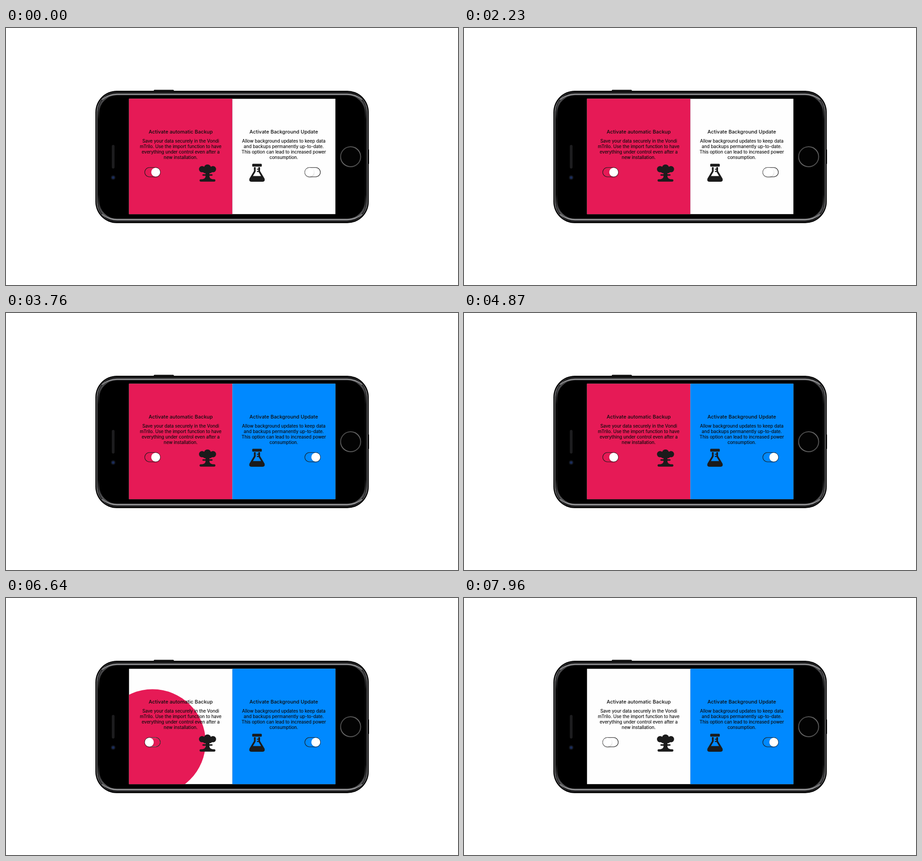
Write an HTML page that moves like this. It is 991 px wide and 565 px high and loops after 7.99 s.

```html
<!DOCTYPE html>
<html lang="en">
<head>
<meta charset="utf-8">
<title>Paper switches</title>
<style>
  html, body { margin: 0; width: 100%; height: 100%; overflow: hidden; background: #fff; }
  svg { display: block; width: 991px; height: 565px; }
  text { font-family: Inter, "Noto Sans", sans-serif; fill: #0c0c0c; text-anchor: middle; }
  .title { font-size: 11px; font-weight: 500; }
  .body { font-size: 9.77px; stroke: #0c0c0c; stroke-width: .15px; }
  .ink { fill: #1b1b1b; }
</style>
</head>
<body>
<svg viewBox="0 0 991 565">
  <defs>
    <linearGradient id="gloss" x1="0" y1="0" x2="0" y2="1">
      <stop offset="0" stop-color="#59595b"/>
      <stop offset=".1" stop-color="#3a3a3c"/>
      <stop offset=".2" stop-color="#0a0a0a"/>
      <stop offset=".8" stop-color="#0a0a0a"/>
      <stop offset=".9" stop-color="#3a3a3c"/>
      <stop offset="1" stop-color="#6a6a6c"/>
    </linearGradient>
    <linearGradient id="rim" x1="0" y1="0" x2="0" y2="1">
      <stop offset="0" stop-color="#2c2c2e"/>
      <stop offset=".12" stop-color="#8c8c8e"/>
      <stop offset=".88" stop-color="#8c8c8e"/>
      <stop offset="1" stop-color="#2c2c2e"/>
    </linearGradient>
    <linearGradient id="ring" x1="0" y1="0" x2="1" y2="1">
      <stop offset="0" stop-color="#3a3a3a"/>
      <stop offset=".5" stop-color="#6c6c6c"/>
      <stop offset="1" stop-color="#444"/>
    </linearGradient>
    <filter id="soft" x="-50%" y="-50%" width="200%" height="200%">
      <feGaussianBlur stdDeviation="1.6"/>
    </filter>
    <clipPath id="leftClip"><rect x="269.7" y="155.6" width="226.5" height="253.6"/></clipPath>
    <clipPath id="rightClip"><rect x="496.2" y="155.6" width="226" height="253.6"/></clipPath>
  </defs>

  <!-- phone -->
  <rect x="324" y="135.8" width="44" height="6" rx="1.5" fill="#222"/>
  <rect x="790" y="267" width="6" height="32" rx="1" fill="#222"/>
  <rect x="196" y="138" width="599.3" height="291" rx="47"/>
  <rect x="202.5" y="145.5" width="586.3" height="276" rx="41" fill="none" stroke="url(#gloss)" stroke-width="4.5"/>
  <rect x="199.3" y="141" width="592.7" height="285" rx="44" fill="none" stroke="url(#rim)" stroke-width="1.4"/>
  <path d="M211 157Q222 147 243 146H748Q769 147 780 157M211 410Q222 420 243 421H748Q769 420 780 410"
    fill="none" stroke="#a4a4a6" stroke-width="1.6" stroke-linecap="round"/>
  <rect x="232" y="257" width="6" height="52" rx="3" fill="#1d1d1f"/>
  <circle cx="235" cy="328.8" r="5" fill="#12161f"/>
  <circle cx="235" cy="328.8" r="2.8" fill="#1b2d5c"/>
  <circle cx="755.6" cy="283" r="22" fill="#030303" stroke="url(#ring)" stroke-width="2"/>

  <!-- screen -->
  <rect x="269.7" y="155.6" width="452.5" height="253.6" fill="#fefefe"/>
  <g clip-path="url(#leftClip)"><circle id="leftDisc" cx="321.2" cy="317" fill="#e61a56"/></g>
  <g clip-path="url(#rightClip)"><circle id="rightDisc" cx="672.2" cy="317" fill="#0089ff"/></g>
  <rect x="495.8" y="155.6" width="1.2" height="253.6" fill="#8793a8" opacity=".35"/>
  <g id="copy"></g>

  <!-- mushroom cloud -->
  <g class="ink">
    <circle cx="429.9" cy="310.4" r="6.8"/><circle cx="441.8" cy="307.8" r="7.8"/><circle cx="453.8" cy="310.4" r="6.8"/>
    <circle cx="436.6" cy="313.4" r="5.8"/><circle cx="447" cy="313.4" r="5.8"/>
    <rect x="430.5" y="321.4" width="22.5" height="3.4" rx="1.7"/>
    <path d="M437.5 316h8.5v10q0 5 7 6.5h3.5a2.6 2.6 0 0 1 0 5.2h-29.5a2.6 2.6 0 0 1 0-5.2h3.5q7-1.5 7-6.5z"/>
  </g>

  <!-- flask -->
  <g class="ink">
    <rect x="539.8" y="298.4" width="21" height="6.4" rx="1.6"/>
    <path fill-rule="evenodd" d="M543.6 306h13.4v8.4l9.8 16.6q2 7-4.2 7h-24.6q-6.2 0-4.2-7l9.8-16.6z
      M547.4 306v9.6l-6 9.8h17.8l-6-9.8v-9.6z"/>
    <path d="M550 309.4h4v2.2h-4zM550 314.2h4v2.2h-4z"/>
  </g>

  <g id="switches"></g>
</svg>

<script>
const LOOP = 7990, FULL_RADIUS = 238, DISC_TIME = 413;
const RED = [230, 26, 86], BLUE = [0, 137, 255], WHITE = [232, 226, 229];
const byId = id => document.getElementById(id);

function add(parent, tag, attrs, text) {
  const node = document.createElementNS('http://www.w3.org/2000/svg', tag);
  set(node, attrs);
  if (text) node.textContent = text;
  return parent.appendChild(node);
}
function set(node, attrs) {
  for (const key in attrs) node.setAttribute(key, attrs[key]);
}

function addCopy(x, title, lines) {
  add(byId('copy'), 'text', { x, y: 231.9, class: 'title' }, title);
  lines.forEach((line, i) =>
    add(byId('copy'), 'text', { x, y: 251.5 + i * 12, class: 'body' }, line));
}
addCopy(383, 'Activate automatic Backup', [
  'Save your data securely in the Vondi',
  'mTrilo. Use the import function to have',
  'everything under control even after a',
  'new installation.']);
addCopy(609, 'Activate Background Update', [
  'Allow background updates to keep data',
  'and backups permanently up-to-date.',
  'This option can lead to increased power',
  'consumption.']);

const mix = (a, b, p) => a + (b - a) * p;
const mixColor = (a, b, p) => `rgb(${a.map((v, i) => Math.round(mix(v, b[i], p)))})`;
const progress = (t, start, length) => Math.min(1, Math.max(0, (t - start) / length));
const smooth = p => p * p * (3 - 2 * p);

// cubic-bezier(0, 0, .58, 1)
function easeOut(p) {
  let low = 0, high = 1;
  for (let i = 0; i < 20; i++) {
    const s = (low + high) / 2;
    if (1.74 * (1 - s) * s * s + s ** 3 < p) low = s; else high = s;
  }
  return 3 * (1 - low) * low * low + low ** 3;
}

const pill = (cx, w, h) =>
  `M${cx - w + h} ${317 - h}H${cx + w - h}a${h} ${h} 0 0 1 0 ${2 * h}H${cx - w + h}a${h} ${h} 0 0 1 0 ${-2 * h}z`;

function makeSwitch(cx) {
  const outline = pill(cx, 17, 10.2);
  const group = add(byId('switches'), 'g', {});
  const fill = add(group, 'path', { 'fill-rule': 'evenodd' });
  const shadow = add(group, 'rect', { y: 309, height: 19.6, rx: 9.8, opacity: .22, filter: 'url(#soft)' });
  add(group, 'path', { d: outline, fill: 'none', stroke: '#1a1a1a', 'stroke-width': 1.1 });
  const thumb = add(group, 'rect', { y: 307.2, height: 19.6, rx: 9.8, fill: '#fff' });

  // on: thumb position, hole: scale of the clear middle, press: thumb stretch
  return (on, hole, press, color) => {
    const opening = hole > 0 ? pill(mix(cx + 7, cx, hole), 16.4 * hole, 9.6 * hole) : '';
    set(fill, { d: outline + opening, fill: color });
    const box = { x: cx + mix(-7, 7, on) - 9.8 - 4 * press * on, width: 19.6 + 4 * press };
    set(shadow, box);
    set(thumb, box);
  };
}
const drawLeft = makeSwitch(321.2), drawRight = makeSwitch(672.2);

function draw(t) {
  const press = (down, up) => smooth(progress(t, down, 90)) * (1 - smooth(progress(t, up, 150)));

  const grow = 1 - easeOut(1 - progress(t, 2215, DISC_TIME));
  byId('rightDisc').setAttribute('r', FULL_RADIUS * grow);
  const turnOn = smooth(progress(t, 2225, 240));
  drawRight(turnOn, 1 - turnOn, press(2110, 2230), mixColor(WHITE, BLUE, turnOn));

  const shrink = easeOut(progress(t, 6496, DISC_TIME));
  byId('leftDisc').setAttribute('r', FULL_RADIUS * (1 - shrink));
  const turnOff = smooth(progress(t, 6090, 200));
  drawLeft(1 - turnOff, progress(t, 6130, 360), press(5985, 6060),
    mixColor(RED, WHITE, progress(t, 6090, 110)));
}

function tick() {
  draw(performance.now() % LOOP);
  requestAnimationFrame(tick);
}
tick();
</script>
</body>
</html>
```
